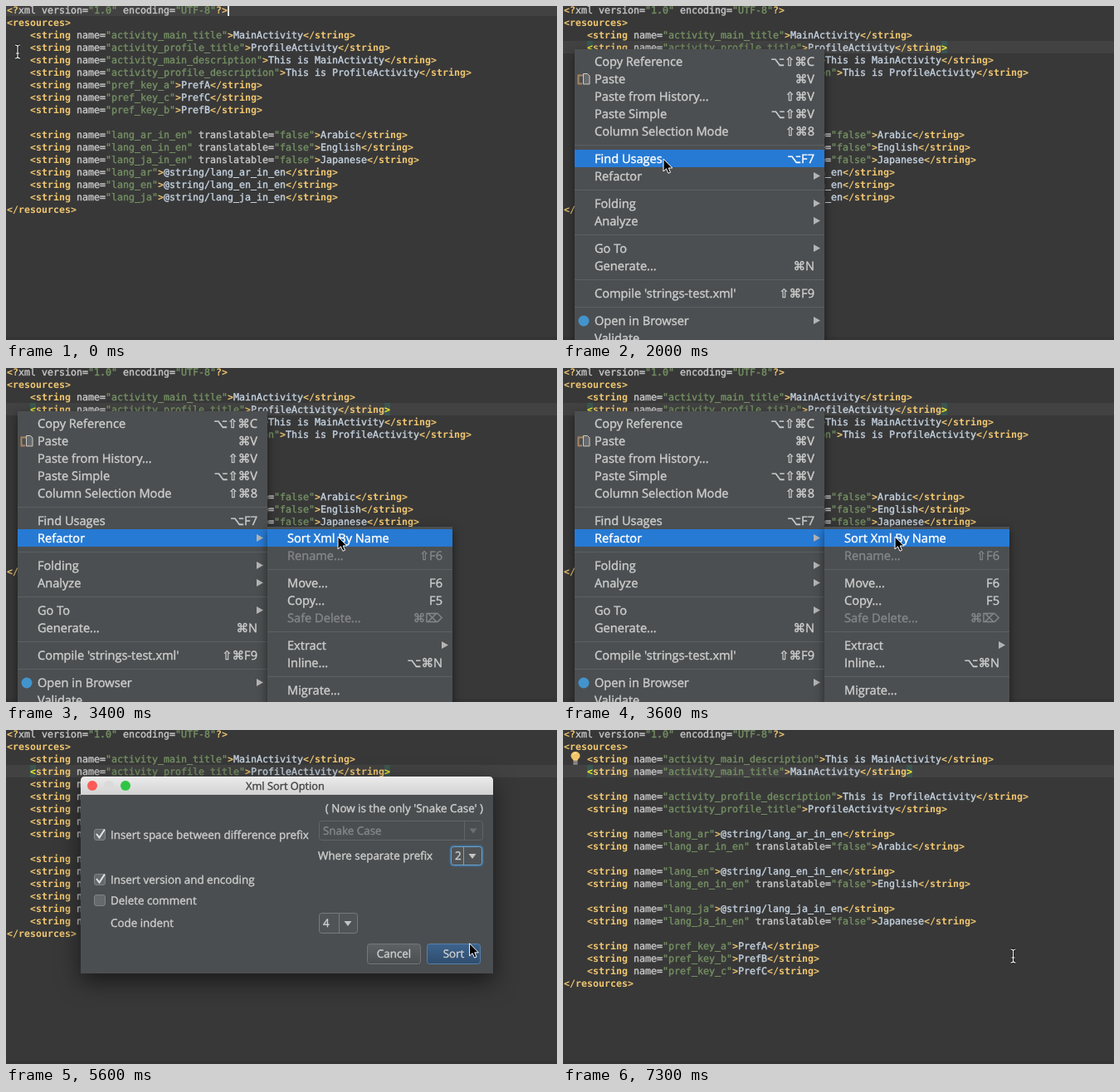
Animation of 664x402 px, one loop 7400 ms. Source, as an HTML page:

```html
<!DOCTYPE html>
<html lang="en">
<head>
<meta charset="utf-8">
<title>Sort XML by name</title>
<style>
  html, body { margin: 0; width: 100%; height: 100%; overflow: hidden; background: #383838; }
  svg { display: block; width: 664px; height: 402px; }
  text { white-space: pre; text-rendering: geometricPrecision; }
  text, tspan { fill: currentColor; stroke: currentColor; stroke-width: .4; }
  .code { font: 11.63px "DejaVu Sans Mono", monospace; }
  .tag { color: #f0c670; }
  .attr { color: #c6c6c6; }
  .val { color: #748f63; }
  .txt { color: #c3d0de; }
  .brace { color: #ffef28; }
  .tag, .brace { font-weight: bold; stroke: none; }
  .menu { font: 14.6px "Open Sans", "DejaVu Sans", sans-serif; color: #cdcdcd; }
  .form { font: 13.4px "Open Sans", "DejaVu Sans", sans-serif; color: #cdcdcd; }
  .off { color: #85878a; }
  .on { color: #fff; }
  .heading { font-size: 12.8px; color: #444; }
  .shadow { filter: drop-shadow(0 4px 6px rgba(0,0,0,.5)); }
  .deep { filter: drop-shadow(0 10px 14px rgba(0,0,0,.55)); }
</style>
</head>
<body>
<svg id="stage" viewBox="0 0 664 402">
  <defs>
    <linearGradient id="bar" x2="0" y2="1"><stop stop-color="#ebebeb"/><stop offset="1" stop-color="#d2d2d2"/></linearGradient>
    <linearGradient id="plain" x2="0" y2="1"><stop stop-color="#5c6164"/><stop offset="1" stop-color="#4b4f51"/></linearGradient>
    <linearGradient id="main" x2="0" y2="1"><stop stop-color="#3d638c"/><stop offset="1" stop-color="#2f4d6e"/></linearGradient>
  </defs>
</svg>
<script>
const LOOP = 7400, STEP = 100, COL = 7, ROW = 15, BLUE = '#267ad4';
const stage = document.getElementById('stage');

function el(parent, name, attrs = {}, text) {
  const node = document.createElementNS('http://www.w3.org/2000/svg', name);
  for (const k in attrs) node.setAttribute(k, attrs[k]);
  if (text !== undefined) node.textContent = text;
  return parent.appendChild(node);
}
const group = (parent, attrs) => el(parent, 'g', attrs);
const rect = (p, x, y, width, height, fill, more) => el(p, 'rect', { x, y, width, height, fill, ...more });
const path = (p, d, more) => el(p, 'path', { d, ...more });
const dot = (p, cx, cy, r, fill) => el(p, 'circle', { cx, cy, r, fill });
const label = (p, x, y, text, more) => el(p, 'text', { x, y, ...more }, text);
const show = (node, on) => node.setAttribute('visibility', on ? 'visible' : 'hidden');

// Code editor

const entry = (name, value, extra = '') => `    <string name="${name}"${extra}>${value}</string>`;
const title = n => entry(`activity_${n.toLowerCase()}_title`, `${n}Activity`);
const about = n => entry(`activity_${n.toLowerCase()}_description`, `This is ${n}Activity`);
const pref = c => entry(`pref_key_${c}`, 'Pref' + c.toUpperCase());
const langs = { ar: 'Arabic', en: 'English', ja: 'Japanese' };
const langIn = c => entry(`lang_${c}_in_en`, langs[c], ' translatable="false"');
const langRef = c => entry('lang_' + c, `@string/lang_${c}_in_en`);
const codes = Object.keys(langs);
const wrap = body => ['<?xml version="1.0" encoding="UTF-8"?>', '<resources>', ...body, '</resources>'];

const unsorted = wrap([
  title('Main'), title('Profile'), about('Main'), about('Profile'),
  ...['a', 'c', 'b'].map(pref), '', ...codes.map(langIn), ...codes.map(langRef)
]);
const sorted = wrap([
  about('Main'), title('Main'), '', about('Profile'), title('Profile'), '',
  ...codes.flatMap(c => [langRef(c), langIn(c), '']), ...['a', 'b', 'c'].map(pref)
]);

function tokenClass(s, inTag) {
  if (/^(<|\?>|>)/.test(s)) return 'tag';
  if (s[0] === '"') return 'val';
  return inTag ? 'attr' : 'txt';
}

function drawCode(lines) {
  const g = group(stage, { class: 'code' });
  lines.forEach((line, row) => {
    const text = el(g, 'text', { y: 9 + row * ROW });
    let inTag = false;
    for (const m of line.matchAll(/<\?|<\/?\w+|\?>|>|"[^"]*"|[^<>"?]+/g)) {
      const s = m[0];
      if (s[0] === '<') inTag = true;
      el(text, 'tspan', { x: 1 + m.index * COL, class: tokenClass(s, inTag) }, s);
      if (s.endsWith('>')) inTag = false;
    }
  });
  return g;
}

// Matching angle brackets on the fourth line
function drawBraces(line) {
  const g = group(stage, { class: 'code' });
  [4, line.length - 1].forEach(col => {
    const x = 1 + col * COL;
    rect(g, x, 42, COL, ROW, '#3b5650');
    label(g, x, 54, line[col], { class: 'brace' });
  });
  return g;
}

const caretRow = rect(stage, 0, 0, 664, ROW, '#424242');
rect(stage, 0, 398, 664, 4, '#343434');
const before = drawCode(unsorted), after = drawCode(sorted);
const bracesBefore = drawBraces(unsorted[3]), bracesAfter = drawBraces(sorted[3]);
const caret = rect(stage, 267, -1, 2, 13, '#e4e4e4');

const bulb = group(stage, { transform: 'translate(15 34)' });
path(bulb, 'M-2.5 3C-2.5 1-5.5 0-5.5-3A5.5 5 0 0 1 5.5-3C5.5 0 2.5 1 2.5 3Z', { fill: '#f3c56b' });
path(bulb, 'M-3-4.5Q-1.5-6.5 1-6.5', { fill: 'none', stroke: '#fff0c0' });
rect(bulb, -2.5, 3.5, 5, 4, '#a9a9a9');
path(bulb, 'M-2.5 5.5H2.5', { stroke: '#555' });

// Context menus

function drawMenu(x, top, width, first, items) {
  const g = group(stage, { class: 'menu' });
  rect(g, x, top, width, 420 - top, '#4c4f51', { class: 'shadow' });
  const rows = [];
  let y = first;
  for (const [text, key, off] of items) {
    if (text === '-') {
      rect(g, x, y - 5, width, 1, '#5d6062');
      y += 12;
      continue;
    }
    const row = group(g, off ? { class: 'off' } : {});
    const bar = rect(row, x, y - 11, width, 21, BLUE);
    label(row, x + 24, y + 5, text);
    if (key === '>') path(row, `M${x + width - 13} ${y - 5}l8 4.5l-8 4.5Z`, { fill: '#b4b4b4' });
    else if (key) label(row, x + width - 12, y + 5, key, { 'text-anchor': 'end' });
    rows.push({ row, bar, y, text, off });
    y += 21;
  }
  return { g, rows };
}

function highlight(menu, test) {
  for (const r of menu.rows) {
    const on = test(r);
    r.bar.setAttribute('opacity', on ? 1 : 0);
    if (!r.off) r.row.setAttribute('class', on ? 'on' : '');
  }
}

const menu = drawMenu(14, 52, 301, 67, [
  ['Copy Reference', '⌥⇧⌘C'], ['Paste', '⌘V'], ['Paste from History...', '⇧⌘V'],
  ['Paste Simple', '⌥⇧⌘V'], ['Column Selection Mode', '⇧⌘8'], ['-'],
  ['Find Usages', '⌥F7'], ['Refactor', '>'], ['-'],
  ['Folding', '>'], ['Analyze', '>'], ['-'],
  ['Go To', '>'], ['Generate...', '⌘N'], ['-'],
  ["Compile 'strings-test.xml'", '⇧⌘F9'], ['-'],
  ['Open in Browser', '>'], ['Validate']
]);
path(menu.g, 'M23 93.5H18.5V83.5H27', { fill: 'none', stroke: '#a88660', 'stroke-width': 2 });
path(menu.g, 'M24.5 81.5h5l2.5 2.5v10h-7.5Z', { fill: '#66696b', stroke: '#cfcac4' });
dot(menu.g, 25, 379, 6.5, '#4294cc');

const submenu = drawMenu(315, 191, 223, 205, [
  ['Sort Xml By Name'], ['Rename...', '⇧F6', 1], ['-'],
  ['Move...', 'F6'], ['Copy...', 'F5'], ['Safe Delete...', '⌘⌦', 1], ['-'],
  ['Extract', '>'], ['Inline...', '⌥⌘N'], ['-'], ['Migrate...']
]);

// Options dialog

const dialog = group(stage, { class: 'form' });

function checkbox(y, text, checked) {
  rect(dialog, 106.5, y - 6.5, 13, 13, '#65696b', { rx: 2.5, stroke: '#808487' });
  if (checked) path(dialog, `M109 ${y - 1}l3.5 4.5l6.5-10`, { fill: 'none', stroke: '#e4e4e4', 'stroke-width': 2 });
  label(dialog, 126, y + 4.5, text);
}

function combo(x, y, w, h, text, stroke, cls = '') {
  rect(dialog, x + .5, y + .5, w, h, cls ? 'none' : '#505456', { rx: 3, stroke });
  const split = x + w - 21.5;
  path(dialog, `M${split} ${y + 1}V${y + h}`, { stroke });
  path(dialog, `M${split + 6} ${y + h / 2 - 2}h9l-4.5 6Z`, { fill: cls ? '#6c6f71' : '#c4c4c4' });
  return label(dialog, x + 5, y + h / 2 + 5, text, { class: cls });
}

function button(x, text, fill, stroke) {
  rect(dialog, x + .5, 257.5, 64, 24, `url(#${fill})`, { rx: 3, stroke });
  label(dialog, x + 32.5, 274, text, { 'text-anchor': 'middle' });
}

path(dialog, 'M90 293V61q0-5 5-5H582q5 0 5 5V293Z', { fill: '#4b4e50', class: 'deep' });
path(dialog, 'M90 78V61q0-5 5-5H582q5 0 5 5V78Z', { fill: 'url(#bar)' });
['#fc5b57', '#dadada', '#2fc544'].forEach((c, i) => dot(dialog, 104 + 20 * i, 67, 6, c));
label(dialog, 336.5, 72, 'Xml Sort Option', { 'text-anchor': 'middle', class: 'heading' });
label(dialog, 575, 98.5, "( Now is the only 'Snake Case' )", { 'text-anchor': 'end' });
label(dialog, 376, 156, 'Where separate prefix');
checkbox(126, 'Insert space between difference prefix', true);
checkbox(180, 'Insert version and encoding', true);
checkbox(205, 'Delete comment', false);
label(dialog, 126, 237, 'Code indent');
combo(377, 109, 197, 23, 'Snake Case', '#626567', 'off');
combo(377, 220, 46, 24, '4', '#777b7d');
rect(dialog, 535.5, 139.5, 39, 24, 'none', { rx: 4, stroke: '#3f6c92', 'stroke-width': 2 });
const picked = combo(536, 140, 37, 22, '1', '#6ea3cc');
button(435, 'Cancel', 'plain', '#73777a');
button(507, 'Sort', 'main', '#5580ad');

const list = group(dialog);
rect(list, 535.5, 164.5, 39, 73, '#45494b', { stroke: '#111' });
const mark = rect(list, 536, 165, 38, 18, BLUE);
for (let i = 0; i < 4; i++) label(list, 538, 179 + 18 * i, i + 1);

// Pointer

const arrow = path(stage, 'M0 0V15L3.5 11.8L6 17.3L8.5 16.2L6.2 11H10.8Z', { fill: '#000', stroke: '#fff' });
const beam = group(stage, { fill: 'none' });
const beamPath = 'M-3-8Q0-8 0-6Q0-8 3-8M0-6V6M-3 8Q0 8 0 6Q0 8 3 8M-2 2H2';
path(beam, beamPath, { stroke: '#111', 'stroke-width': 3 });
path(beam, beamPath, { stroke: '#f4f4f4', 'stroke-width': 1.2 });

const route = [
  [0, 13.5, 51], [1300, 13.5, 51], [1900, 121, 184], [2100, 121, 184], [2300, 126, 204],
  [2600, 126, 204], [3300, 400, 203], [3700, 400, 203], [4400, 550, 155], [4900, 550, 155],
  [5100, 552, 190], [5200, 552, 190], [5400, 606, 225], [5700, 542, 268], [LOOP, 542, 268]
];

function pointerAt(t) {
  const i = route.findIndex(p => p[0] > t);
  const [t0, x0, y0] = route[i - 1], [t1, x1, y1] = route[i];
  const u = (t - t0) / (t1 - t0), k = u * u * (3 - 2 * u);
  return [x0 + (x1 - x0) * k, y0 + (y1 - y0) * k];
}

function update(time) {
  const t = Math.floor((time % LOOP) / STEP) * STEP;
  const during = (a, b) => t >= a && t < b;
  const [x, y] = pointerAt(t);

  const clicked = t >= 1000, done = t >= 6300;
  caretRow.setAttribute('y', clicked ? 42 : -3);
  show(caret, t < 500);
  show(before, !done);
  show(after, done);
  show(bracesBefore, clicked && !done);
  show(bracesAfter, done);
  show(bulb, t >= 6900);

  const menuOpen = during(1000, 3700), subOpen = during(2500, 3700);
  const under = r => Math.abs(y - r.y + .5) <= 10.5;
  show(menu.g, menuOpen);
  show(submenu.g, subOpen);
  highlight(menu, r => subOpen ? r.text === 'Refactor' : under(r));
  highlight(submenu, r => x >= 315 && under(r));

  const dialogOpen = during(3800, 5900);
  show(dialog, dialogOpen);
  show(list, dialogOpen && during(4500, 5200));
  mark.setAttribute('y', y > 183 ? 183 : 165);
  picked.textContent = t >= 5200 ? 2 : 1;

  const overUi = during(1000, 5900);
  show(arrow, overUi);
  show(beam, !overUi);
  arrow.setAttribute('transform', `translate(${x} ${y})`);
  beam.setAttribute('transform', `translate(${x + .5} ${y + 4})`);
}

const start = performance.now();
function tick() {
  update(performance.now() - start);
  requestAnimationFrame(tick);
}
tick();
</script>
</body>
</html>
```
